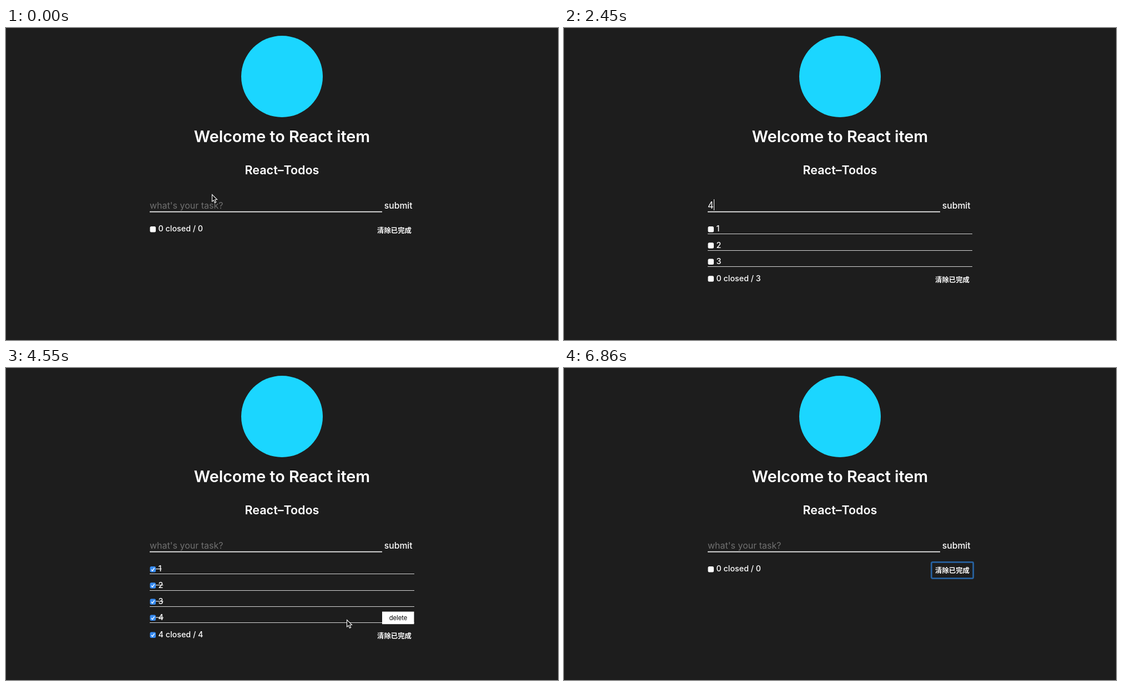
An HTML page with a canvas that plays this animation: 995x563 px, repeating every 6.93 s.

```html
<!DOCTYPE html>
<html lang="en">
<head>
<meta charset="utf-8">
<title>Todos</title>
<style>
  html, body { margin: 0; width: 100%; height: 100%; overflow: hidden; background: #1d1d1d; }
  canvas { display: block; width: 995px; height: 563px; }
</style>
</head>
<body>
<canvas id="stage" width="995" height="563"></canvas>
<script>
const ctx = document.getElementById('stage').getContext('2d');
const LOOP = 6930, STEP = 70;
const LEFT = 259, RIGHT = 736, CENTER = 497.5, ROW = 29.2, LIST_TOP = 345;
const SANS = 'Inter, "Open Sans", sans-serif';
const CJK = '"Noto Sans CJK SC", "Noto Sans CJK", sans-serif';
const BACK = '#1d1d1d', WHITE = '#fff', LOGO = '#1bd6ff';

const TASKS = [
  { typed: 1330, sent: 1540 },
  { typed: 1820, sent: 1960 },
  { typed: 2100, sent: 2310 },
  { typed: 2450, sent: 2660 },
];
const FOCUS = 490, TYPING_HIDES = 630, POINTER_BACK = 3080, POINTER_GONE = 6860;
const CHECK_ALL = 3920, PRESS_CLEAR = 5180, CLEAR = 5250;

const linear = k => k;
const easeOut = k => 1 - (1 - k) ** 2;

// Places the pointer visits, and how it travels between them
const start = { x: 371, y: 300 }, input = { x: 356, y: 322 }, allBox = { x: 264, y: 479 };
const lastRow = { x: 614, y: 454 }, clearButton = { x: 703, y: 482 };
const aside = { x: 776, y: 370 }, exit = { x: 980, y: 563 };
const GLIDES = [
  { begin: 0, end: FOCUS, from: start, to: input },
  { begin: POINTER_BACK, end: 3890, from: input, to: allBox, ease: easeOut, bow: 11 },
  { begin: 3960, end: 4550, from: allBox, to: lastRow },
  { begin: 4690, end: PRESS_CLEAR, from: lastRow, to: clearButton },
  { begin: 5600, end: 5950, from: clearButton, to: aside, ease: easeOut, bow: -22 },
  { begin: 6230, end: POINTER_GONE, from: aside, to: exit },
];

const ARROW = new Path2D('M0 0V12.6L2.8 10.1L4.9 14.8L7.1 13.8L5.1 9.3L9 9.1Z');
const TEXT_POINTER = new Path2D('M-3 -8.5L0 -7L3 -8.5M0 -7V7M-3 8.5L0 7L3 8.5');
const TICK = new Path2D('M3 5.6L5 8L8.6 2.7');

const within = (t, from, to) => t >= from && t < to;

function text(str, x, y, size, { weight = 400, color = WHITE, align = 'left', family = SANS } = {}) {
  ctx.font = `${weight} ${size}px ${family}`;
  ctx.fillStyle = color;
  ctx.textAlign = align;
  ctx.fillText(str, x, y);
  return ctx.measureText(str).width;
}

function rect(x, y, w, h, color) {
  ctx.fillStyle = color;
  ctx.fillRect(x, y, w, h);
}

function shape(path, x, y, { fill, stroke, width = 1 }) {
  ctx.save();
  ctx.translate(x, y);
  if (fill) {
    ctx.fillStyle = fill;
    ctx.fill(path);
  }
  if (stroke) {
    ctx.strokeStyle = stroke;
    ctx.lineWidth = width;
    ctx.stroke(path);
  }
  ctx.restore();
}

function roundBox(w, h, radius) {
  const path = new Path2D();
  path.roundRect(0, 0, w, h, radius);
  return path;
}

function checkbox(y, checked) {
  shape(roundBox(10.5, 10.5, 2.5), LEFT + 0.5, y, { fill: checked ? '#378bf2' : '#fafafa' });
  if (checked) shape(TICK, LEFT, y, { stroke: WHITE, width: 1.4 });
}

function pointerAt(t) {
  const { begin, end, from, to, ease = linear, bow = 0 } = GLIDES.findLast(g => t >= g.begin);
  const k = ease(Math.min(1, (t - begin) / (end - begin)));
  return {
    x: from.x + (to.x - from.x) * k + bow * Math.sin(Math.PI * k),
    y: from.y + (to.y - from.y) * k,
  };
}

const rowUnder = t => Math.floor((pointerAt(t).y - LIST_TOP) / ROW);

// Hover shows once the pointer has stayed on a row for one step
function hoveredRow(t) {
  if (t < POINTER_BACK + STEP) return -1;
  const row = rowUnder(t);
  return row === rowUnder(t - STEP) ? row : -1;
}

function drawHeader() {
  ctx.beginPath();
  ctx.arc(CENTER, 87.5, 73.5, 0, Math.PI * 2);
  ctx.fillStyle = LOGO;
  ctx.fill();
  text('Welcome to React item', CENTER, 206, 28.7, { weight: 600, align: 'center' });
  text('React–Todos', CENTER, 264, 21.5, { weight: 600, align: 'center' });
}

function drawInput(t) {
  const current = TASKS.findIndex(task => within(t, task.typed, task.sent));
  let caretX = LEFT;
  if (current >= 0) caretX += text(String(current + 1), LEFT, 325.7, 16.6);
  else text("what's your task?", LEFT, 325.7, 16, { color: '#707070' });
  if (within(t, FOCUS, 980) || within(t, TASKS[0].typed, POINTER_BACK)) {
    rect(Math.round(caretX), 309, 1, 20, WHITE);
  }
  rect(LEFT, 330.8, 419, 1.7, '#f4f4f4');
  text('submit', 681.8, 326, 15.7, { weight: 500 });
}

function drawRow(index, done, hovered) {
  const dy = index * ROW;
  checkbox(358 + dy, done);
  const width = text(String(index + 1), 274.5, 367.3 + dy, 14.3, { weight: 500 });
  if (done) rect(270, 362 + dy, 4.5 + width, 1.1, WHITE);
  rect(LEFT, Math.round(371.4 + dy), RIGHT - LEFT, 1, '#d6d6d6');
  if (hovered) {
    rect(678, 352 + dy, 57.5, 22.6, WHITE);
    text('delete', 707, 367.6 + dy, 11.2, { color: '#000', align: 'center' });
  }
}

function drawFooter(t, count, done) {
  const dy = count ? count * ROW + 1.6 : 0;
  checkbox(358 + dy, done);
  text(`${done ? count : 0} closed / ${count}`, 274.5, 367.3 + dy, 14.3, { weight: 500 });
  text('清除已完成', 669, 370 + dy, 12.4, { weight: 700, family: CJK });
  if (t >= PRESS_CLEAR) {
    shape(roundBox(75.4, 29.2, 2), 662.3, 350.4 + dy, { stroke: '#27619f', width: 2.8 });
  }
}

function drawPointer(t) {
  const { x, y } = pointerAt(t);
  if (t < FOCUS || within(t, POINTER_BACK, POINTER_GONE)) {
    shape(ARROW, x + 0.5, y + 0.5, { fill: '#0c0c0c', stroke: WHITE, width: 1.1 });
  } else if (t < TYPING_HIDES) {
    shape(TEXT_POINTER, x + 0.5, y + 0.5, { stroke: '#aaa' });
  }
}

function draw(t) {
  rect(0, 0, 995, 563, BACK);
  const count = t >= CLEAR ? 0 : TASKS.filter(task => t >= task.sent).length;
  const done = within(t, CHECK_ALL, CLEAR);
  const hovered = hoveredRow(t);
  drawHeader();
  drawInput(t);
  for (let i = 0; i < count; i++) drawRow(i, done, i === hovered);
  drawFooter(t, count, done);
  drawPointer(t);
}

const origin = performance.now();
function frame() {
  const t = (performance.now() - origin) % LOOP;
  draw(Math.floor(t / STEP) * STEP);
  requestAnimationFrame(frame);
}
frame();
</script>
</body>
</html>
```
